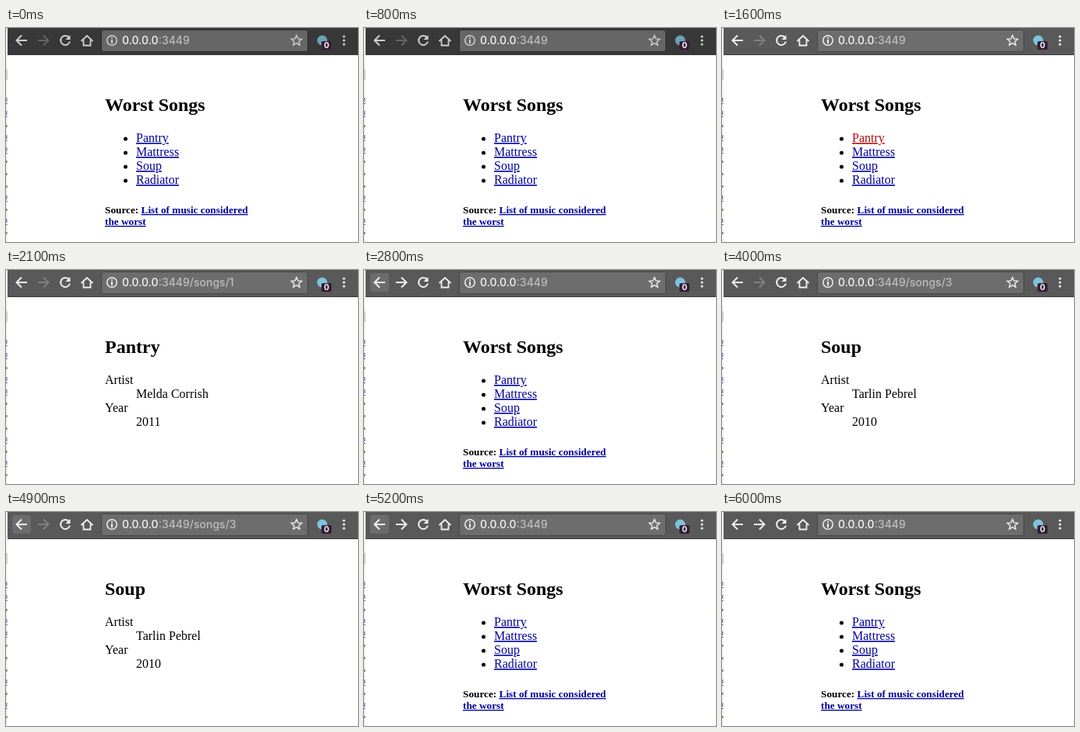
An HTML page for the animation above (6100 ms loop, 452x276 px).

```html
<!DOCTYPE html>
<html lang="en">
<head>
<meta charset="utf-8">
<title>Worst Songs</title>
<style>
  html, body { margin: 0; width: 100%; height: 100%; overflow: hidden; background: #fff; }
  svg { display: block; width: 452px; height: 276px; }
  .page { font: 16px "Liberation Serif", serif; fill: #000; }
  .page .title { font-size: 24px; font-weight: bold; }
  .page .source { font-size: 13.28px; font-weight: bold; }
  .link { fill: #00009c; text-decoration: underline 1px; text-decoration-skip-ink: none; }
  .link.active { fill: #b00a10; }
  .icons { fill: none; stroke: var(--icon); stroke-width: 2; }
  .url { font: 500 14px Inter, sans-serif; fill: #f4f4f4; }
  .badge { font: bold 10px Inter, sans-serif; fill: #fff; text-anchor: middle; }
  #toolbar { --bar: #383838; --field: #666; --edge: #2c2c2c; --icon: #cfcfcf; --off: #656565; --ext: #6ba3b5; }
  #toolbar.focused { --bar: #595959; --field: #6d6d6d; --edge: #464646; --icon: #f0f0f0; --off: #808080; --ext: #7dc3dc; }
</style>
</head>
<body>
<svg viewBox="0 0 452 276">
  <rect width="452" height="276" fill="#fff"/>

  <!-- sliver of the window behind -->
  <g id="behind">
    <rect width="2" height="276" fill="#f4f4f4"/>
    <rect y="53" width="2" height="14" fill="#d0d0d0"/>
  </g>

  <g id="toolbar">
    <rect x="2" width="450" height="35" fill="var(--bar)"/>
    <rect x="2" y="34" width="450" height="1" fill="#383838"/>
    <rect id="hover" x="8" y="4" width="24" height="24" rx="3" fill="#6c6c6c"/>
    <rect x="122.500" y="2.500" width="265" height="28" rx="3" fill="var(--field)" stroke="var(--edge)"/>
    <g class="icons">
      <path d="M27 16H14M20 9.500L13.500 16L20 22.500"/>
      <path id="forward" d="M41 16H54M48 9.500L54.500 16L48 22.500"/>
      <path d="M80.500 11.700A6 6 0 1 0 82 17.500"/>
      <path d="M82.500 9V15H76.500Z" fill="var(--icon)" stroke="none"/>
      <path d="M96.500 17L104 10L111.500 17M99.500 15.500V22.500H108.500V15.500" stroke-width="1.800"/>
      <circle cx="136" cy="16" r="6.300" stroke-width="1.500"/>
      <path d="M136 15V20M136 12V13.700"/>
      <path d="M373 9.500L374.900 13.900L379.700 14.300L376 17.400L377.100 22.100L373 19.600L368.900 22.100L370 17.400L366.300 14.300L371.100 13.900Z" stroke-width="1.400"/>
    </g>
    <text class="url" x="149" y="21">0.0.0.0<tspan id="path" fill="#bdbdbd"></tspan></text>
    <circle cx="406" cy="16" r="6.500" fill="var(--ext)"/>
    <rect x="405" y="17" width="13" height="11" rx="2" fill="#361c38"/>
    <text class="badge" x="411.500" y="26.200">0</text>
    <g fill="var(--icon)">
      <circle cx="434" cy="11" r="1.600"/><circle cx="434" cy="16" r="1.600"/><circle cx="434" cy="21" r="1.600"/>
    </g>
  </g>

  <g id="list" class="page">
    <text class="title" x="127" y="107">Worst Songs</text>
    <g id="items"></g>
    <text class="source" x="127" y="239">Source: <tspan class="link">List of music considered</tspan></text>
    <text class="source link" x="127" y="254">the worst</text>
  </g>

  <g id="detail" class="page">
    <text id="song" class="title" x="127" y="107"></text>
    <text x="127" y="147">Artist</text>
    <text id="artist" x="167" y="165"></text>
    <text x="127" y="183">Year</text>
    <text id="year" x="167" y="201"></text>
  </g>
</svg>

<script>
const LOOP = 6100;
const songs = [
  { title: "Pantry", artist: "Melda Corrish", year: 2011 },
  { title: "Mattress" },
  { title: "Soup", artist: "Tarlin Pebrel", year: 2010 },
  { title: "Radiator" }
];
const visits = [
  { song: 0, press: 1500, open: 1700, hover: 2300, back: 2600, leave: 3000 },
  { song: 2, press: 3700, open: 3900, hover: 4900, back: 5100, leave: 5400 }
];
const $ = id => document.getElementById(id);
const within = (t, from, to) => t >= from && t < to;
const show = (id, on) => $(id).setAttribute("visibility", on ? "visible" : "hidden");

$("items").innerHTML = songs.map(({ title }, i) => `
  <circle cx="153.500" cy="${143 + 18 * i}" r="2.500"/>
  <text class="link" x="167" y="${147 + 18 * i}">${title}</text>`).join("");
const links = [...$("items").querySelectorAll("text")];

// clipped ends of the text lines in the window behind
const mark = (y, h, color) => `<rect y="${y}" width="1.500" height="${h}" fill="${color}"/>`;
$("behind").innerHTML +=
  [90, 107, 138, 154, 216, 246].map(y => mark(y, 5, "#8585c4") + mark(y + 7, 1, "#3838a0")).join("") +
  [125, 171, 187, 203, 233, 263].map(y => mark(y, 3, "#777")).join("");

function draw(t) {
  const visit = visits.find(v => within(t, v.open, v.back));
  const pressed = visits.find(v => within(t, v.press, v.open));
  const canForward = visits.some((v, i) =>
    within(t, v.back, visits[i + 1]?.open ?? LOOP));

  $("toolbar").classList.toggle("focused", t >= 1000);
  $("forward").style.stroke = canForward ? "var(--icon)" : "var(--off)";
  show("hover", visits.some(v => within(t, v.hover, v.leave)));
  show("list", !visit);
  show("detail", visit);
  links.forEach((link, i) => link.classList.toggle("active", pressed?.song === i));
  $("path").textContent = ":3449" + (visit ? `/songs/${visit.song + 1}` : "");
  if (visit) {
    const { title, artist, year } = songs[visit.song];
    $("song").textContent = title;
    $("artist").textContent = artist;
    $("year").textContent = year;
  }
}

const start = performance.now();
function tick() {
  draw((performance.now() - start) % LOOP);
  requestAnimationFrame(tick);
}
tick();
</script>
</body>
</html>
```
